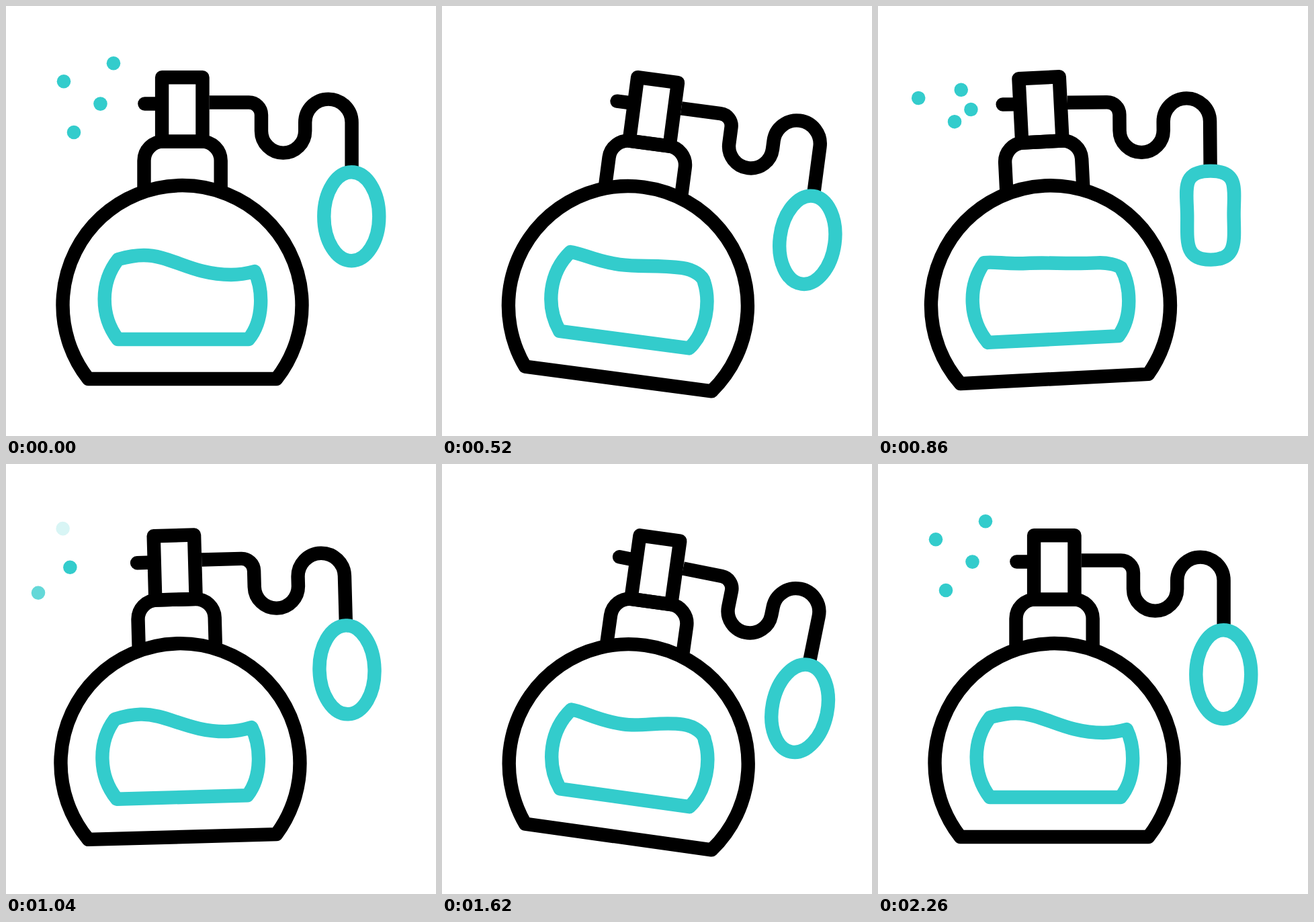
Animation, 640 px wide and 640 px high, one loop 2400 ms. Source, as an HTML page:

```html
<!DOCTYPE html>
<html lang="en">
<head>
<meta charset="utf-8">
<title>Perfume atomizer</title>
<style>
  html, body { margin: 0; width: 100%; height: 100%; overflow: hidden; background: #fff; }
  svg { display: block; width: 100%; height: 100%; }
  path, rect { fill: none; stroke: #000; stroke-width: 20.4; stroke-linejoin: round; }
  .teal { stroke: #3cc; }
  circle { fill: #3cc; }
</style>
</head>
<body>
<svg viewBox="0 0 640 640">
  <g id="bottle">
    <g id="spray"></g>
    <g id="hose">
      <path d="M221.8 145.5H206.4" stroke-linecap="round"/>
      <path d="M302.6 143.5H361.5A18.5 18.5 0 0 1 380 162V186A32.6 32.6 0 0 0 445.2 186V173.3A34.7 34.7 0 0 1 514.6 173.3V244"/>
      <path id="bulb" class="teal" transform="translate(514.3 313.2)"/>
    </g>
    <rect x="232.1" y="106.2" width="60.4" height="95.4"/>
    <path d="M205.5 275V230A28.5 28.5 0 0 1 234 201.6H291.2A28.5 28.5 0 0 1 319.7 230V275"/>
    <path d="M122.5 555A178 178 0 1 1 402.5 555Z"/>
    <path id="label" class="teal"/>
  </g>
</svg>
<script>
  const LOOP = 2400;
  const [bottle, spray, hose, bulb, label] =
    ['bottle', 'spray', 'hose', 'bulb', 'label'].map(id => document.getElementById(id));

  const mix = (a, b, k) => a + (b - a) * k;
  const ramp = (t, from, to) => Math.min(1, Math.max(0, (t - from) / (to - from)));
  const ease = (t, from, to) => {
    const u = ramp(t, from, to);
    return u * u * (3 - 2 * u);
  };
  // Rises over a..b, falls over c..d.
  const pulse = (t, a, b, c, d) => ease(t, a, b) - ease(t, c, d);

  const tilt = t => 8 * ease(t, 0, 610) - 11 * pulse(t, 610, 875, 875, 1610)
    - 14 * ease(t, 1610, 1905) + 6 * ease(t, 1905, 2170);
  const droop = t => 4 * (pulse(t, 600, 715, 740, 1020) + pulse(t, 1480, 1660, 1680, 2080));
  const squeeze = t => pulse(t, 600, 710, 740, 1000) + pulse(t, 1640, 1850, 1890, 2140);
  const slosh = t => pulse(t, 0, 660, 720, 1040) + pulse(t, 1060, 1600, 1680, 2170);

  // Ellipse at k = 0, pinched at the waist at k = 1.
  function bulbPath(k) {
    const w = mix(41, 29.7, k), h = mix(36.5, 39, k);
    const top = mix(22.6, 61, k), low = mix(22.6, 54, k);
    return `M0 -66C${top} -66 ${w} ${-h} ${w} 0C${w} ${h} ${low} 66 0 66` +
      `C${-low} 66 ${-w} ${h} ${-w} 0C${-w} ${-h} ${-top} -66 0 -66Z`;
  }

  // The liquid's surface has a crest and a trough that swap as k goes to 1.
  function labelPath(k) {
    const x = mix(205, 247, k), left = mix(371, 388, k), right = mix(400, 376, k);
    return `M167 377C${mix(178, 185, k)} ${mix(374, 377, k)} ${mix(191, 207, k)} ${left} ${x} ${left}` +
      `C${mix(246, 276, k)} ${left} ${mix(276, 300, k)} ${right} 335 ${right}` +
      `C${mix(348, 352, k)} ${right} ${mix(359, 368, k)} ${mix(398, 385, k)} 370 395` +
      'C383 422 384 468 361 496H166.5C140 461 140 411 167 377Z';
  }

  const nozzle = { x: 198, y: 147.5 };
  const drops = [[86, 112.3], [160, 85.2], [101, 188], [140.5, 145.6]].map(([x, y]) => {
    const dot = document.createElementNS('http://www.w3.org/2000/svg', 'circle');
    dot.setAttribute('r', 10.3);
    spray.append(dot);
    return { dot, rest: { x, y }, far: { x: x - 66, y: y + 4.3 } };
  });

  // Drift off and fade, then a full burst, then a puff that settles at rest.
  function moveDrop({ dot, rest, far }, i, t) {
    const lag = 36 * i;
    let from, to, k, alpha;
    if (t < 620) {
      [from, to] = [rest, far];
      k = ease(t, lag, lag + 417);
      alpha = 1 - ramp(t, 288 + lag, 348 + lag);
    } else if (t < 1500) {
      [from, to] = [nozzle, far];
      k = ease(t, 628, 1012 + 78 * i);
      alpha = t < 645 ? 0 : 1 - ramp(t, 953 + lag, 1016 + lag);
    } else {
      [from, to] = [nozzle, rest];
      k = ease(t, 1570 + lag, 2133 + lag);
      alpha = t < 1630 + lag ? 0 : 1;
    }
    dot.setAttribute('cx', mix(from.x, to.x, k));
    dot.setAttribute('cy', mix(from.y, to.y, k));
    dot.setAttribute('opacity', alpha);
  }

  function draw(now) {
    const t = now % LOOP;
    bottle.setAttribute('transform', `rotate(${tilt(t)} 262.5 555)`);
    hose.setAttribute('transform', `rotate(${droop(t)} 262.5 144.5)`);
    bulb.setAttribute('d', bulbPath(squeeze(t)));
    label.setAttribute('d', labelPath(slosh(t)));
    drops.forEach((drop, i) => moveDrop(drop, i, t));
  }

  let start;
  function tick(now) {
    start ??= now;
    draw(now - start);
    requestAnimationFrame(tick);
  }
  draw(0);
  requestAnimationFrame(tick);
</script>
</body>
</html>
```
